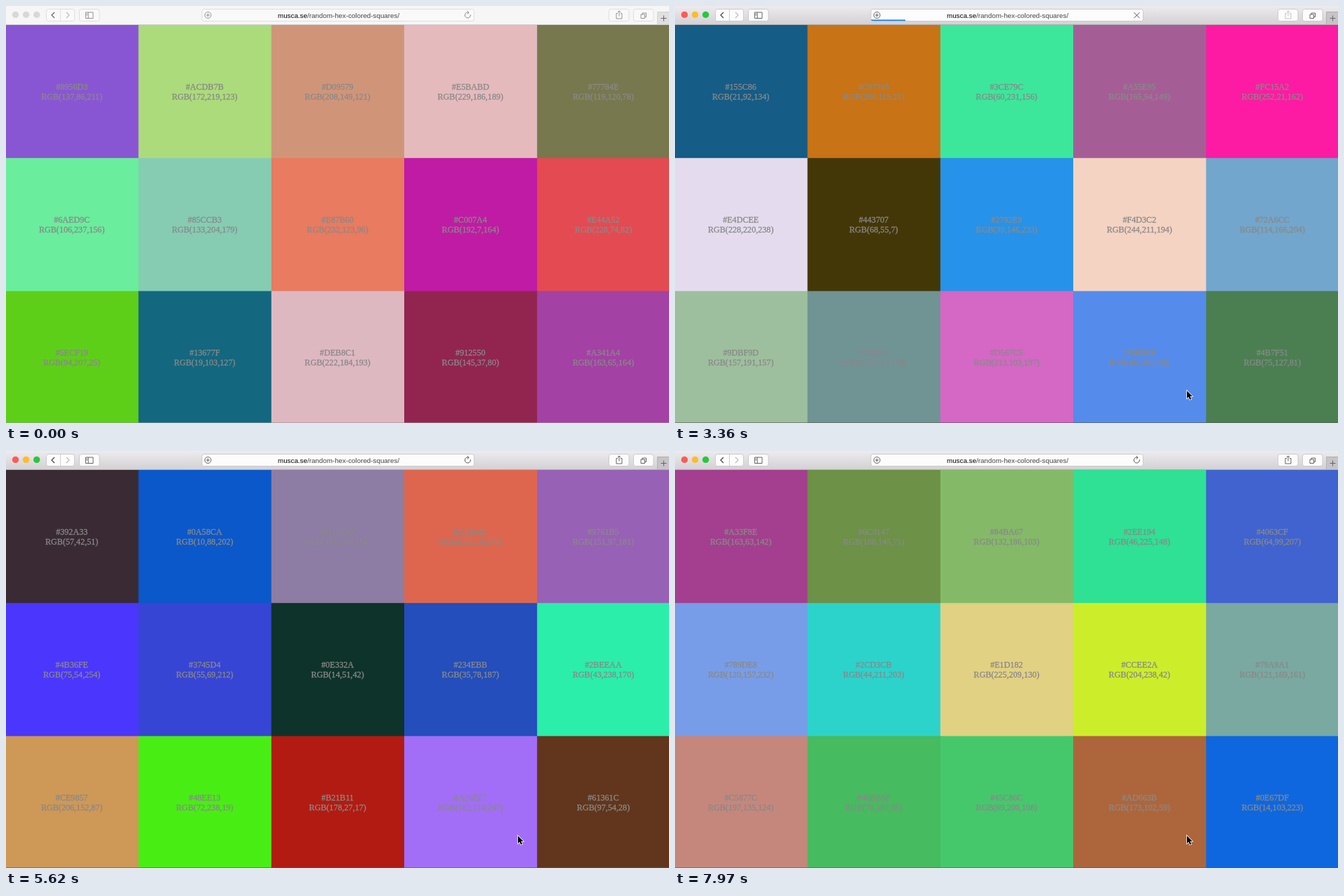
These frames come from a looping animation (944x593 px, 8 s). An HTML page with a canvas:

```html
<!DOCTYPE html>
<html lang="en">
<head>
<meta charset="utf-8">
<title>Random hex colored squares</title>
<style>
  html, body { margin: 0; width: 100%; height: 100%; overflow: hidden; background: #f6f6f6; }
  canvas { display: block; }
</style>
</head>
<body>
<canvas id="stage" width="944" height="593"></canvas>
<script>
const ctx = document.getElementById('stage').getContext('2d');
const LOOP = 8000, STEP = 90;
const COLUMNS = 5, TILE = 189.2, TOP = 27;
const FIELD = { x: 279, y: 4.5, w: 387.5, h: 17 };
const FIELD_END = FIELD.x + FIELD.w;

// Page content: one set of squares per visit
const pages = [
  '8956D3 ACDB7B D09579 E5BABD 77784E 6AED9C 85CCB3 E87B60 C007A4 E44A52 5ECF19 13677F DEB8C1 912550 A341A4',
  '155C86 C87315 3CE79C A55E95 FC15A2 E4DCEE 443707 2792E9 F4D3C2 72A6CC 9DBF9D 709394 D567C5 558BEB 4B7F51',
  '392A33 0A58CA 8D7CA4 DE664E 9761B5 4B36FE 3745D4 0E332A 234EBB 2BEEAA CE9857 48EE13 B21B11 A26EF7 61361C',
  'A33F8E 6C9147 84BA67 2EE194 4063CF 789DE8 2CD3CB E1D182 CCEE2A 79A9A1 C5877C 46BB5F 45C86C AD663B 0E67DF'
].map(list => list.split(' '));

// A reload creeps to `creep`, swaps the page, waits at `wait`, then fills up
const reloads = [
  { start: 3100, swap: 3360, fill: 4000, end: 4350, creep: 328, wait: 328 },
  { start: 4970, swap: 5150, fill: 5440, end: 5620, creep: 314, wait: 411 },
  { start: 7320, swap: 7500, fill: 7790, end: 7970, creep: 301, wait: 395 }
];

const mix = (a, b, p) => a + (b - a) * Math.min(1, p);

// Moves in visible steps; the first step shows at once
const stepped = (t, from, to) => (Math.floor((t - from) / STEP) + 1) * STEP / (to - from);

function progressEnd(t) {
  const load = reloads.find(r => t >= r.start && t < r.end);
  if (!load) return 0;
  const { start, swap, fill, end, creep, wait } = load;
  if (t < swap) return mix(FIELD.x, creep, stepped(t, start, swap));
  if (t < fill) return wait;
  return mix(wait, FIELD_END, stepped(t, fill, end - STEP));
}

function roundBox({ x, y, w, h }) {
  ctx.beginPath();
  ctx.roundRect(x, y, w, h, 3);
}

function button(area, fill, border) {
  roundBox(area);
  ctx.fillStyle = fill;
  ctx.fill();
  ctx.strokeStyle = border;
  ctx.lineWidth = 0.8;
  ctx.stroke();
}

function line(color, path, width = 0.9) {
  ctx.strokeStyle = color;
  ctx.lineWidth = width;
  ctx.stroke(new Path2D(path));
}

function rect(color, x, y, w, h) {
  ctx.fillStyle = color;
  ctx.fillRect(x, y, w, h);
}

// Slightly thickened text, as with font smoothing
function label(text, x, y) {
  ctx.fillText(text, x, y);
  ctx.strokeText(text, x, y);
}

function drawTiles(colors) {
  ctx.font = '12.11px "Liberation Serif", "Times New Roman", serif';
  ctx.textAlign = 'center';
  colors.forEach((hex, i) => {
    const col = i % COLUMNS, row = Math.floor(i / COLUMNS);
    const x = TILE * col - 0.6, y = TOP + TILE * row;
    const [r, g, b] = hex.match(/../g).map(h => parseInt(h, 16));
    // The display cannot show very low greens
    rect(`rgb(${r},${Math.max(27, g)},${b})`, x, y, TILE + 1, TILE + 1);
    ctx.fillStyle = ctx.strokeStyle = '#898989';
    ctx.lineWidth = 0.3;
    const center = x + TILE / 2 - 0.3;
    label('#' + hex, center, y + 92);
    label(`RGB(${r},${g},${b})`, center, y + 105.6);
  });
}

function drawToolbar(active, lit, bar, canShare) {
  const shade = ctx.createLinearGradient(0, 0, 0, 26);
  shade.addColorStop(0, active ? '#edebed' : '#f6f6f6');
  shade.addColorStop(1, active ? '#d3d1d3' : '#f6f6f6');
  rect(shade, 0, 0, 944, TOP);

  ['#fc5b57', '#fdbb2e', '#27c83f'].forEach((color, i) => {
    ctx.beginPath();
    ctx.arc(13.5 + 15.1 * i, 12.4, 4.7, 0, 7);
    ctx.fillStyle = active ? color : '#d8d8d8';
    ctx.fill();
  });

  const border = active ? '#c4c2c4' : '#d9d9d9';
  const face = active ? '#fcfcfc' : '#f9f9f9';
  const icon = lit ? '#555' : '#8a8a8a', faint = '#bdbdbd';
  button({ x: 57.5, y: 4.5, w: 40, h: 17 }, face, border);
  for (const x of [104.5, 858.5, 893.5]) button({ x, y: 4.5, w: 28.5, h: 17 }, face, border);
  line(border, 'M77.5 4.5v17', 0.8);
  line(lit ? '#444' : '#666', 'M69 9l-4 4 4 4', 1.2);
  line(faint, 'M86 9l4 4-4 4', 1.2);
  line(icon, 'M113.5 9h10.5v8.5h-10.5zM117.2 9v8.5M114.5 11.2h1.7M114.5 13h1.7');
  line(canShare ? icon : faint, 'M871 10.5h-2v7.5h8v-7.5h-2M873 14.5v-7.5M870.9 9l2.1-2.1 2.1 2.1');
  line(icon, 'M904 12h5.5v5.5h-5.5zM906 12v-2h5.5v5.5h-2');

  // New tab button and lower edge
  rect(active ? '#c6c4c6' : '#e0e0e0', 928, 8, 16, 18);
  line(active ? '#aaa8aa' : '#cfcfcf', 'M944 8.5h-16.5v18', 0.8);
  line('#666', 'M932.5 17.5h8M936.5 13.5v8', 1);
  rect(active ? '#b0aeb0' : '#d0d0d0', 0, 26, 944, 1);

  button(FIELD, face, border);
  drawAddress(icon, bar);
}

function drawAddress(icon, bar) {
  ctx.save();
  roundBox(FIELD);
  ctx.clip();
  if (bar) rect('#1a82fb', FIELD.x, 19.4, bar - FIELD.x, 1.9);
  ctx.restore();

  line(icon, 'M292 13a4.5 4.5 0 1 0-9 0a4.5 4.5 0 1 0 9 0M285 13h5M287.5 10.5v5');
  line(icon, bar ? 'M653.5 9.2l8 8M661.5 9.2l-8 8'
                 : 'M661.3 12.2a4 4 0 1 1-2.4-2.9M656.6 7.2l2.6 2.2-2.4 2.2', 1);

  ctx.font = '9.8px "Liberation Sans", Arial, sans-serif';
  ctx.textAlign = 'left';
  const host = 'musca.se';
  ctx.fillStyle = '#000';
  ctx.fillText(host, 387, 16.5);
  ctx.fillStyle = '#444';
  ctx.fillText('/random-hex-colored-squares/', 387 + ctx.measureText(host).width, 16.5);
}

// Enters from the lower edge and jumps to its resting place in two steps
function drawCursor(t) {
  if (t < 180) return;
  const p = t < 380 ? 0 : t < 470 ? 0.65 : 1;
  ctx.save();
  ctx.translate(mix(776, 729, p), mix(588, 547.2, p));
  const arrow = new Path2D('M0 0v10.8l2.4-2.2 1.7 4 1.9-.8-1.7-3.9h3.3z');
  ctx.strokeStyle = '#fff';
  ctx.lineWidth = 1.5;
  ctx.stroke(arrow);
  ctx.fillStyle = '#000';
  ctx.fill(arrow);
  ctx.restore();
}

function draw(t) {
  const active = t >= 2630, lit = t >= 2710;
  const page = reloads.filter(r => t >= r.swap).length;
  const canShare = !reloads.some(r => t >= r.start && t < r.swap + 80);
  drawTiles(pages[page]);
  rect(active ? 'rgba(90,90,90,.6)' : 'rgba(150,150,150,.6)', 0, 592, 944, 1);
  drawToolbar(active, lit, progressEnd(t), canShare);
  drawCursor(t);
}

let start;
function tick(now) {
  start ??= now;
  draw((now - start) % LOOP);
  requestAnimationFrame(tick);
}
draw(0);
requestAnimationFrame(tick);
</script>
</body>
</html>
```
